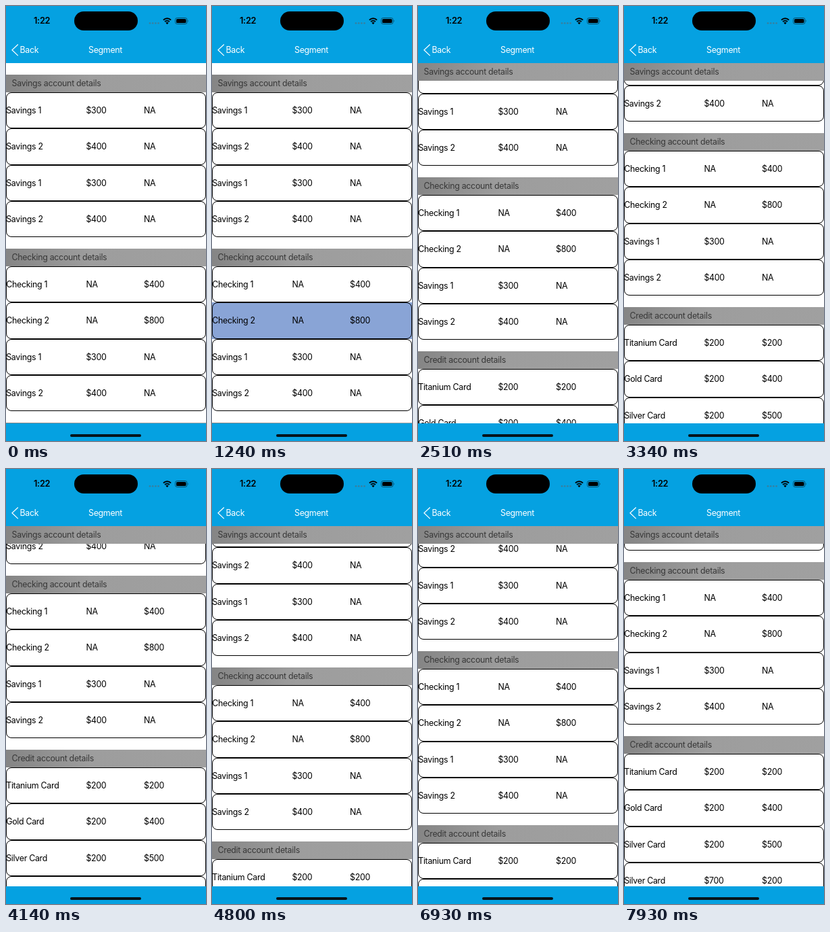
An HTML page for the animation above (8000 ms loop, 296x640 px).

```html
<!DOCTYPE html>
<html lang="en">
<head>
<meta charset="utf-8">
<title>Segment</title>
<style>
  html, body { margin: 0; width: 100%; height: 100%; overflow: hidden; background: #fff; }
  body {
    position: relative;
    font: 12.4px/16px Inter, "Liberation Sans", sans-serif;
    letter-spacing: -.3px;
    color: #000;
  }
  .bar { position: absolute; left: 0; width: 100%; background: #05a1e1; }
  .top { top: 0; height: 84px; color: #fff; }
  .bottom { top: 614px; height: 26px; }
  .bar svg { position: absolute; left: 0; top: 0; }
  .bar span { position: absolute; white-space: nowrap; }
  .clock { left: 41px; top: 14px; font-size: 12.8px; font-weight: 600; color: #000; }
  .back { left: 20.5px; top: 57px; }
  .title { left: 122px; top: 57px; }
  .home { position: absolute; left: 95px; top: 16px; width: 105px; height: 4px; border-radius: 2px; background: #06141b; }

  #list { position: absolute; left: 0; top: 84px; width: 100%; height: 530px; overflow: hidden; }
  section { height: 239.7px; margin-bottom: 16.3px; }
  section:first-child { margin-top: 16.7px; }
  #content { display: flow-root; }
  h2 {
    position: sticky; top: 0; z-index: 1;
    box-sizing: border-box; height: 26.3px; margin: 0; padding-left: 8.5px;
    font: inherit; line-height: 26.3px; color: #383838;
    background: linear-gradient(90deg, #858585, #9d9d9d 42%, #a0a0a0);
  }
  .cell { height: 53.35px; }
  .cell.on { background: #89a4d6; }
  .row {
    position: relative; box-sizing: border-box; height: 100%;
    border: 1px solid #000; border-radius: 8px; line-height: 51.35px;
  }
  .row span { position: absolute; top: 0; left: -.8px; white-space: nowrap; }
  .row span:nth-child(2) { left: 117.4px; }
  .row span:nth-child(3) { left: 203px; }
</style>
</head>
<body>
<div id="list"><div id="content"></div></div>

<div class="bar top">
  <svg width="296" height="84">
    <rect x="101" y="8" width="94" height="28" rx="14"/>
    <g fill="#397f9e">
      <circle cx="213" cy="25.2" r="1.3"/><circle cx="217.2" cy="25.2" r="1.3"/>
      <circle cx="221.4" cy="25.2" r="1.3"/><circle cx="225.6" cy="25.2" r="1.3"/>
    </g>
    <g fill="none" stroke="#000" stroke-width="2">
      <path d="M232.9 20.6a8 8 0 0 1 11.2 0M235.1 23a5 5 0 0 1 6.8 0"/>
    </g>
    <path d="M238.5 27l-2.1-2.2a3 3 0 0 1 4.2 0z"/>
    <rect x="250.5" y="17.5" width="17.5" height="9" rx="2.8" fill="none" stroke="#06506f"/>
    <rect x="252" y="19" width="14.5" height="6" rx="1.6"/>
    <path d="M269 20.5q1.6 1.5 0 3z" fill="#06506f"/>
    <path d="M17.8 56.5L9 64.8l8.8 8.3" fill="none" stroke="#fff" stroke-width="1.2"/>
  </svg>
  <span class="clock">1:22</span>
  <span class="back">Back</span>
  <span class="title">Segment</span>
</div>
<div class="bar bottom"><div class="home"></div></div>

<script>
const LOOP = 8000;
const accounts = {
  Savings: ['Savings 1,$300,NA', 'Savings 2,$400,NA', 'Savings 1,$300,NA', 'Savings 2,$400,NA'],
  Checking: ['Checking 1,NA,$400', 'Checking 2,NA,$800', 'Savings 1,$300,NA', 'Savings 2,$400,NA'],
  Credit: ['Titanium Card,$200,$200', 'Gold Card,$200,$400', 'Silver Card,$200,$500', 'Silver Card,$700,$200']
};
// Screen updates: start, end, number of steps
const bursts = [[1240, 2010, 8], [2110, 2910, 9], [3020, 3940, 10], [4140, 5550, 14], [6160, 7930, 17]];
// Scroll offset: time, pixels
const keys = [
  [0, 0], [1240, 0], [2010, 50], [2510, 105], [3327, 171], [3940, 200],
  [4140, 200], [4791, 65.5], [5550, 0], [6160, 0], [7050, 125], [7930, 220], [LOOP, 220]
];
const taps = [1240, 6160];

const list = document.getElementById('list');
const rowHtml = row => `<div class="cell"><div class="row">${
  row.split(',').map(text => `<span>${text}</span>`).join('')}</div></div>`;
document.getElementById('content').innerHTML = Object.entries(accounts).map(([name, rows]) =>
  `<section><h2>${name} account details</h2>${rows.map(rowHtml).join('')}</section>`).join('');
const tapped = document.querySelectorAll('.cell')[5];

function snap(t) {
  let shown = 0;
  for (const [start, end, count] of bursts) {
    if (t < start) break;
    const step = Math.min(count - 1, Math.floor((t - start) * (count - 1) / (end - start)));
    shown = start + step * (end - start) / (count - 1);
  }
  return shown;
}

const rate = i => (keys[i + 1][1] - keys[i][1]) / (keys[i + 1][0] - keys[i][0]);

// Harmonic mean keeps the curve monotone between keys
function slope(i) {
  if (i === 0 || i === keys.length - 1) return 0;
  const a = rate(i - 1), b = rate(i);
  return a * b > 0 ? 2 * a * b / (a + b) : 0;
}

function offset(t) {
  let i = 0;
  while (i < keys.length - 2 && t >= keys[i + 1][0]) i++;
  const [t0, y0] = keys[i], [t1, y1] = keys[i + 1];
  const d = t1 - t0, u = (t - t0) / d, v = 1 - u;
  return v * v * (1 + 2 * u) * y0 + u * u * (3 - 2 * u) * y1
    + d * u * v * (v * slope(i) - u * slope(i + 1));
}

function draw() {
  const t = snap(performance.now() % LOOP);
  list.scrollTop = offset(t);
  tapped.classList.toggle('on', taps.includes(t));
  requestAnimationFrame(draw);
}
draw();
</script>
</body>
</html>
```
